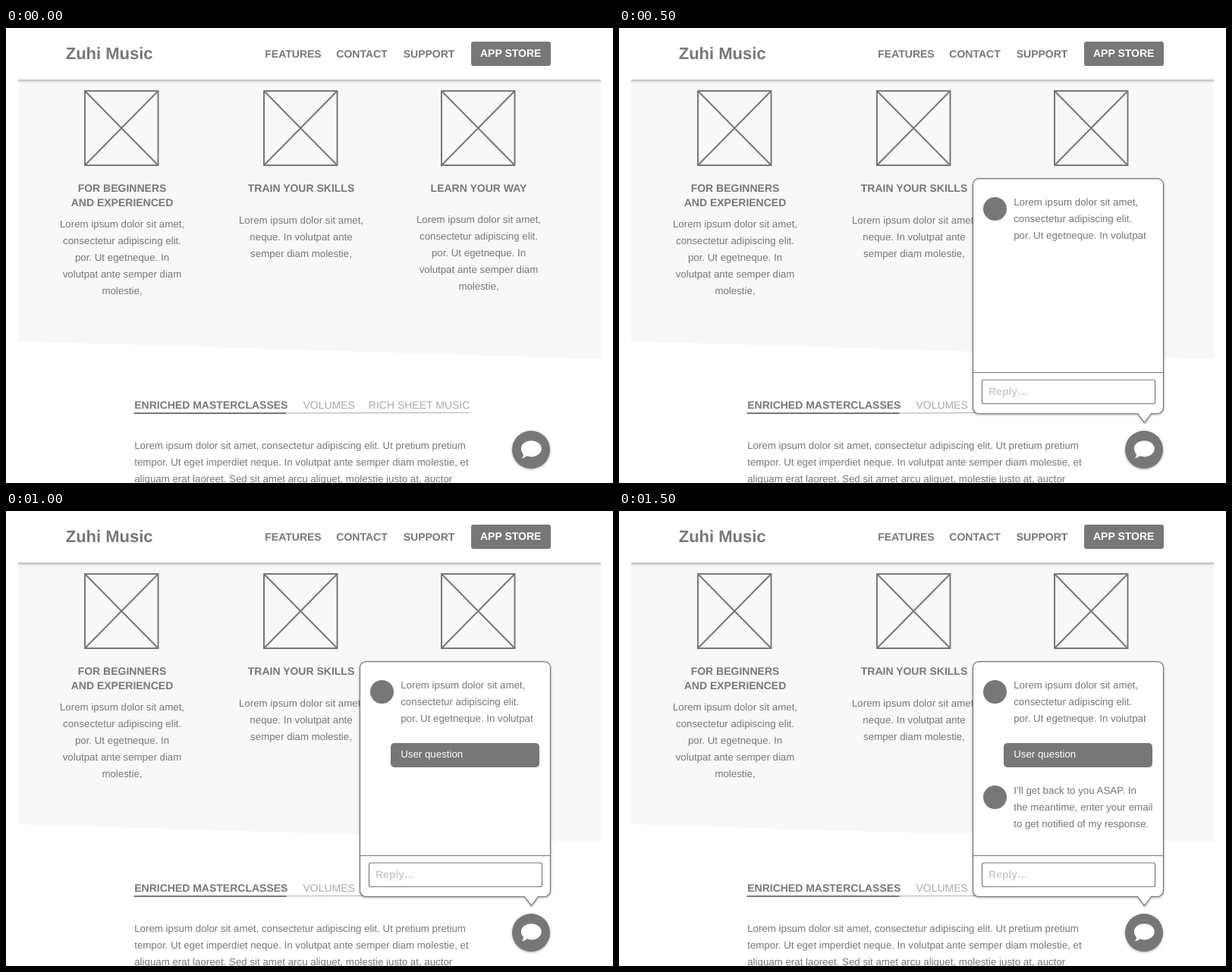
An HTML page that plays this animation: 800 by 600 pixels, repeating every 2 s.

```html
<!DOCTYPE html>
<html lang="en">
<head>
<meta charset="utf-8">
<title>Chat widget wireframe</title>
<style>
  html, body { margin: 0; width: 100%; height: 100%; overflow: hidden; background: #fff; }
  svg { display: block; width: 800px; height: 600px; }
  text {
    font: 13.3px "Liberation Sans", Arial, sans-serif;
    fill: #777;
    text-rendering: geometricPrecision;
    white-space: pre;
  }
  .bold { font-size: 14px; font-weight: bold; }
  .logo { font-size: 22px; font-weight: bold; }
  .tab { font-size: 14px; fill: #aaa; }
  .mid { text-anchor: middle; }
  .white { fill: #fff; }
  .hint { fill: #ccc; }
  .line { fill: none; stroke: #777; stroke-width: 2; }
  .thin { fill: #fff; stroke: #777; stroke-width: 1.2; }
  .dark { fill: #777; }
  .header { filter: drop-shadow(0 1px 2px rgba(0, 0, 0, .4)); }
  .raised { filter: drop-shadow(0 1.5px 1.5px rgba(0, 0, 0, .35)); }
  .step { opacity: 0; }
</style>
</head>
<body>
<svg viewBox="0 0 800 600">
  <defs>
    <clipPath id="page"><rect x="16" width="768" height="600"/></clipPath>
    <g id="image" class="line">
      <rect x="1" y="1" width="96.5" height="98"/>
      <path d="M1 1L97.5 99M97.5 1L1 99"/>
    </g>
  </defs>

  <g id="base">
    <path d="M16 60H784V436.5L16 413Z" fill="#f8f8f8"/>
    <g clip-path="url(#page)"><rect class="header" y="-10" width="800" height="78" fill="#fff"/></g>
    <rect class="dark" x="613" y="18" width="105" height="32" rx="3"/>
    <use href="#image" x="103" y="82"/>
    <use href="#image" x="339" y="82"/>
    <use href="#image" x="573" y="82"/>
    <path d="M369 507.8L610 507.3" stroke="#aaa"/>
    <path class="line" d="M168.5 508H369.5"/>
  </g>

  <g id="popup" class="step">
    <path class="thin raised" d="M474.5 198.6H709.5a8 8 0 0 1 8 8V500.5a8 8 0 0 1 -8 8H701.5L692.5 520.5L683.5 508.5H474.5a8 8 0 0 1 -8 -8V206.6a8 8 0 0 1 8 -8Z"/>
    <path class="thin" d="M467 454.5H717"/>
    <rect class="thin" x="478.5" y="464" width="228" height="31.5" rx="2.5"/>
    <circle class="dark" cx="495.5" cy="238.5" r="15.5"/>
  </g>
  <g id="question" class="step">
    <rect class="dark" x="507" y="306" width="196" height="32" rx="5"/>
  </g>
  <g id="answer" class="step">
    <circle class="dark" cx="495.5" cy="377.5" r="15.5"/>
  </g>

  <g>
    <circle class="dark raised" cx="692" cy="556" r="25"/>
    <path fill="#fff" d="M692.3 544.3c7.6 0 13.4 4.6 13.4 10.5s-5.8 10.6 -13.4 10.6c-2.1 0 -4.2 -.4 -6 -1.1c-1.6 1.7 -3.8 2.8 -6.5 2.9c1.4 -1.5 2.2 -3.300 2.1 -5.300c-1.900 -1.900 -3 -4.400 -3 -7.100c0 -5.900 5.800 -10.500 13.400 -10.500Z"/>
  </g>
</svg>
<script>
  const LOOP = 2000;
  const byId = id => document.getElementById(id);

  // Adds lines of text; y is the first baseline.
  function write(group, x, y, lines, cls = "", gap = 22) {
    [].concat(lines).forEach((line, i) => {
      const t = document.createElementNS(byId("base").namespaceURI, "text");
      t.setAttribute("x", x);
      t.setAttribute("y", y + i * gap);
      t.setAttribute("class", cls);
      t.textContent = line;
      byId(group).append(t);
    });
  }

  write("base", 78.7, 41, "Zuhi Music", "logo");
  write("base", 341.3, 39, "FEATURES", "bold");
  write("base", 435.3, 39, "CONTACT", "bold");
  write("base", 523.7, 39, "SUPPORT", "bold");
  write("base", 625, 38, "APP STORE", "bold white");

  const long = [
    "Lorem ipsum dolor sit amet,", "consectetur adipiscing elit.",
    "por. Ut egetneque. In", "volutpat ante semper diam", "molestie,"
  ];
  const short = [long[0], "neque. In volutpat ante", "semper diam molestie,"];
  const columns = [
    [153, ["FOR BEGINNERS", "AND EXPERIENCED"], 263, long],
    [389, "TRAIN YOUR SKILLS", 258, short],
    [623, "LEARN YOUR WAY", 257, long]
  ];
  for (const [x, title, y, lines] of columns) {
    write("base", x, 216, title, "bold mid", 19);
    write("base", x, y, lines, "mid");
  }

  write("base", 169.2, 502, "ENRICHED MASTERCLASSES", "bold");
  write("base", 391.5, 502, "VOLUMES", "tab");
  write("base", 477.8, 502, "RICH SHEET MUSIC", "tab");
  write("base", 169.2, 555, [
    "Lorem ipsum dolor sit amet, consectetur adipiscing elit. Ut pretium pretium",
    "tempor. Ut eget imperdiet neque. In volutpat ante semper diam molestie, et",
    "aliquam erat laoreet. Sed sit amet arcu aliquet, molestie justo at, auctor"
  ]);

  write("popup", 520.2, 234, [long[0], long[1], "por. Ut egetneque. In volutpat"]);
  write("popup", 487, 484, "Reply…", "bold hint");
  write("question", 520.2, 325, "User question", "white");
  write("answer", 520.2, 373, [
    "I’ll get back to you ASAP. In",
    "the meantime, enter your email",
    "to get notified of my response."
  ]);

  // Each layer switches on at its time and stays until the loop restarts.
  const steps = { popup: 500, question: 1000, answer: 1500 };
  for (const [id, at] of Object.entries(steps)) {
    byId(id).animate([
      { opacity: 0, easing: "step-end" },
      { opacity: 1, offset: at / LOOP },
      { opacity: 1 }
    ], { duration: LOOP, iterations: Infinity });
  }
</script>
</body>
</html>
```
